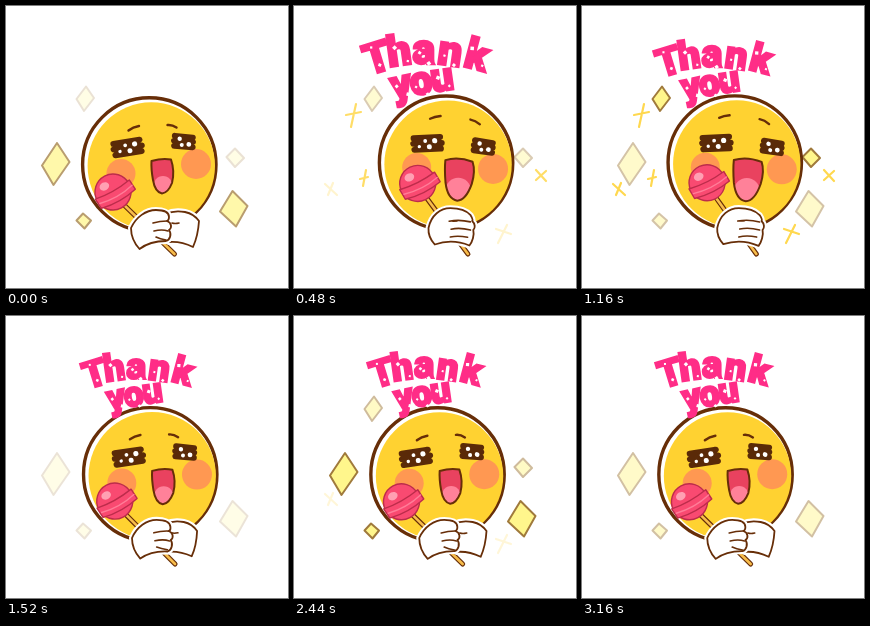
An HTML page that plays this animation: 282 px wide and 282 px high, repeating every 3.2 s.

```html
<!DOCTYPE html>
<html lang="en">
<head>
<meta charset="utf-8">
<title>Thank you</title>
<style>
  html, body { margin: 0; width: 100%; height: 100%; overflow: hidden; background: #fff; }
  svg { display: block; width: 100vw; height: 100vh; }
  path { stroke-linecap: round; stroke-linejoin: round; }
  .ink { fill: none; stroke: #672e08; stroke-width: 2; }
  .hand { fill: #fff; stroke: #672e08; stroke-width: 1.8; }
  .halo { fill: #fff; stroke: #fff; stroke-width: 6; }
  .gem { fill: #fff68c; stroke: #a07a3c; stroke-width: 2; }
  .spark { fill: none; stroke: #ffd84f; stroke-width: 2.2; }
  .lash { fill: none; stroke: #5a2a08; stroke-width: 6; }
  .words { font: 900 38px Roboto, Inter, sans-serif; fill: #ff2d87; stroke: #ff2d87; stroke-width: 2.2; }
</style>
</head>
<body>
<svg viewBox="0 0 282 282">
  <defs>
    <clipPath id="mouthClip"><path data-shape="mouth"/></clipPath>
  </defs>

  <g id="bigGems">
    <path class="gem" d="M51 137L63.5 156 47.5 179 36 159.500Z"/>
    <path class="gem" d="M226.500 185L241.500 200 230 220.500 214 205.500Z"/>
    <path class="gem" d="M77 207.500L85 214.500 78.500 222.500 70.500 214.500Z"/>
  </g>
  <g id="smallGems">
    <path class="gem" d="M80 80.500L88 92 78 105 70.500 93Z"/>
    <path class="gem" d="M229 142.500L238 152 229 161 220.500 151Z"/>
  </g>
  <g id="earlySparks">
    <path class="spark" d="M39 177L34 189M31 178L43 189"/>
    <path class="spark" d="M213 219L204 237M202 223L217 228"/>
  </g>
  <g id="lateSparks">
    <path class="spark" d="M62 98L57 121M52 109L67 106"/>
    <path class="spark" d="M242 164L252 175M252 165L242 174"/>
    <path class="spark" d="M72 164L69 180M66 173L74 171"/>
  </g>

  <circle id="head" r="66.700" fill="#fff" stroke="#672e08" stroke-width="3.400"/>
  <circle id="skin" r="63.700" fill="#ffd231"/>
  <g fill="#ff9852">
    <circle id="blushL" r="14.500"/>
    <circle id="blushR" r="15"/>
  </g>
  <path class="ink" style="stroke-width:2.400" data-shape="brows"/>
  <g id="eyeL">
    <path class="lash" d="M-13.500-5.500L13-6-14 0 14.500 0-13 6 13.500 5.500"/>
    <g fill="#fff"><circle cx="2" cy="3.500" r="2.500"/><circle cx="7.500" cy="-2.500" r="2.600"/><circle cx="-2" cy="-2.500" r="1.900"/><circle cx="-8" cy="3" r="1.700"/></g>
  </g>
  <g id="eyeR">
    <path class="lash" d="M-9-5L9-4.500-9.500 0 9.500 0-9 5 9.500 5"/>
    <g fill="#fff"><circle cx="-4" cy="-2.500" r="2.200"/><circle cx="-1.500" cy="3.500" r="2"/><circle cx="5.500" cy="2.500" r="2.400"/></g>
  </g>
  <path data-shape="mouth" fill="#e9425f"/>
  <ellipse id="tongue" fill="#ff8199" clip-path="url(#mouthClip)"/>
  <path class="ink" data-shape="mouth"/>

  <path data-shape="stick" fill="none" stroke="#672e08" stroke-width="5"/>
  <path data-shape="stick" fill="none" stroke="#f8bd4b" stroke-width="2.600"/>
  <g id="candy" stroke="#bd2c4b" stroke-width="1.400">
    <circle r="18" fill="#f94a71"/>
    <path d="M-19-2Q0 1 20-3L21 8Q2 13-18 9Z" fill="#f94a71"/>
    <path d="M-17 4Q2 8 20 3" fill="none" stroke="#ff7d98"/>
    <ellipse cx="-5" cy="-9" rx="5" ry="4" fill="#ffa0b3" stroke="none"/>
  </g>
  <path class="halo" data-shape="handR"/>
  <path class="hand" data-shape="handR"/>
  <path class="halo" data-shape="handL"/>
  <path class="hand" data-shape="handL"/>
  <path class="ink" style="stroke-width:1.600" data-shape="fingers"/>

  <g id="banner">
    <text class="words"><tspan x="80.500 99 120 141.500 164.500" y="73 65.500 62.500 62.500 64.500" rotate="-17 -8 0 8 15">Thank</tspan>
      <tspan font-size="36" x="103 119.500 138" y="94.500 91.500 88" rotate="-12 -10 -8">you</tspan></text>
    <g id="specks" fill="#fff"></g>
  </g>
</svg>
<script>
const LOOP = 3200, BEAT = 800, STEP = 40;
const $ = id => document.getElementById(id);
const clamp = v => Math.max(0, Math.min(1, v));

// Each shape: its left pose and its right pose, with matching numbers.
const shapes = {
  brows: ["M122.500 124.500Q127 121 133 120M161.500 119Q166 118.500 170.500 121.500",
          "M137.500 111.500Q142 109.500 148 109M178 113Q183 114 187.500 118"],
  mouth: ["M145.5 155Q156 152 165 153.5Q169 165 166 177Q162 187 156 187.500Q149 186 147 174Q145 163 145.500 155Z",
          "M152 154Q165 150 180 156Q183 165 179 178Q173 195 164 195.500Q154 194 152 177Q151 163 152 154Z"],
  stick: ["M116 197L168.500 248", "M134 191L174.500 248"],
  handL: ["M133.500 243C128 237 125 230 125 222C130 211 140 204 150 204C157 204 163 206 163 211C163 213 162 215 161 215C166 217 166 222 163 224C166 228 164 234 160 235C150 235 140 238 133.500 243Z",
          "M141.500 238C137 233 135 228 135.500 222C138 209 147 202 157 202C166 202 174 205 178 209C180 212 181 214 180 215C183 218 183 222 181 224C182 229 180 236 177 240C166 235 154 234 141.500 238Z"],
  handR: ["M160 208Q168 204 179 206Q188 208 193 215Q192 230 187 241Q175 235 163 236Z",
          "M156 208Q160 204 166 206Q171 208 173 215Q176 228 174 233Q168 234 158 232Z"],
  fingers: ["M147 217Q154 215 161 215M148 225Q156 223 162 225M150 231Q154 233 160 234M166 217Q169 218 173 217",
            "M156 215Q167 213 178 216M158 223Q167 221 178 224M157 231Q165 229 175 231M158 215Q160 215 162 215"]
};

// Specks cut out of the letters.
[[82, 47], [90, 62], [104, 46], [115, 59], [126, 51], [135, 60], [148, 54], [157, 62], [172, 47],
 [182, 63], [106, 81], [115, 88], [123, 82], [134, 88], [142, 73], [153, 81]].forEach(([x, y], i) => {
  const speck = document.createElementNS("http://www.w3.org/2000/svg", "rect");
  const size = 2 + i % 3 * 0.6;
  set(speck, { x, y, width: size, height: size, transform: `rotate(${i * 23 % 60} ${x} ${y})` });
  $("specks").append(speck);
});

function set(node, attrs) {
  for (const key in attrs) node.setAttribute(key, attrs[key]);
}

function blend([a, b], s) {
  const ends = b.match(/[\d.]+/g);
  let i = 0;
  return a.replace(/[\d.]+/g, n => (+n + (ends[i++] - n) * s).toFixed(2));
}

// Opacity rising from a to b and falling from c to d within a beat, wrapping at its end.
function glow(time, a, b, c, d) {
  const t = (time - a + 2 * BEAT) % BEAT;
  return Math.min(clamp(t / (b - a)), clamp((d - a - t) / (d - c)));
}

function bannerScale(t) {
  const rise = 350, u = (t - rise) / 1000;
  return u < 0 ? t / rise : 1 + 0.16 * Math.exp(-2 * u) * Math.sin(3 * Math.PI * u);
}

function draw(t) {
  const s = (1 - Math.cos(2 * Math.PI * t / BEAT)) / 2;
  const mix = (a, b) => a + (b - a) * s;
  const place = (id, x, y, turn) => set($(id), { transform: `translate(${x} ${y}) rotate(${turn})` });

  document.querySelectorAll("[data-shape]").forEach(p => set(p, { d: blend(shapes[p.dataset.shape], s) }));

  const cx = mix(143.3, 153), cy = mix(158.5, 156.5);
  set($("head"), { cx, cy });
  set($("skin"), { cx: cx + 2, cy: cy + 1.5 });
  set($("blushL"), { cx: mix(115, 123.5), cy: mix(167.5, 161) });
  set($("blushR"), { cx: mix(190, 200), cy: mix(158, 163.5) });
  set($("tongue"), { cx: mix(157, 165), cy: mix(181, 185), rx: mix(10, 13), ry: mix(11, 13) });
  place("eyeL", mix(121.5, 134.5), mix(141.5, 137), mix(-8, -1));
  place("eyeR", mix(177.5, 190.5), mix(135.5, 141), mix(4, 8));
  place("candy", mix(107, 125.5), mix(186, 176.5), mix(-28, -25));

  set($("bigGems"), { opacity: glow(t, 690, 840, 1080, 1225) });
  set($("smallGems"), { opacity: glow(t, -30, 110, 400, 530) });
  set($("earlySparks"), { opacity: glow(t, 10, 150, 400, 510) });
  set($("lateSparks"), { opacity: glow(t, 180, 320, 460, 600) });

  set($("banner"), { transform: `translate(133 104) scale(${bannerScale(t)}) translate(-133 -104)` });
}

const start = performance.now();
function tick() {
  const t = (performance.now() - start) % LOOP;
  draw(Math.floor(t / STEP) * STEP);
  requestAnimationFrame(tick);
}
tick();
</script>
</body>
</html>
```
